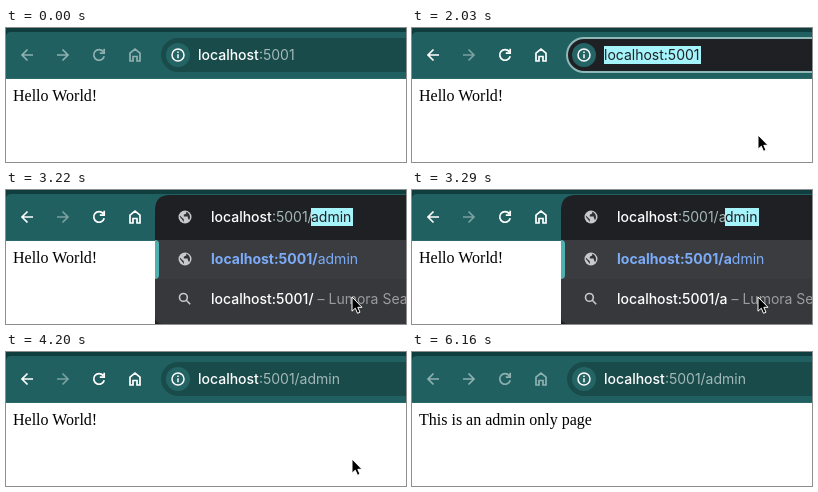
Animation of 400 by 134 pixels, one loop 6230 ms. Source, as an HTML page:

```html
<!DOCTYPE html>
<html lang="en">
<head>
<meta charset="utf-8">
<title>Visiting the admin page</title>
<style>
  html, body { margin: 0; width: 100%; height: 100%; overflow: hidden; background: #fff; }
  svg { display: block; width: 400px; height: 134px; }
  text { font: 14px Inter, Roboto, sans-serif; white-space: pre; }
  .host { fill: #fff; font-weight: 500; }
  .path { fill: #a3b8b8; }
  .dark { fill: #1f2023; }
  .page { font: 16px "Liberation Serif", "Times New Roman", serif; fill: #000; }
  .link { fill: #7cacf8; }
  .bold { font-weight: 700; }
  .hint { fill: #9a9ca0; }
  .line { fill: none; stroke-width: 1.7; }
</style>
</head>
<body>
<svg viewBox="0 0 400 134">
  <defs>
    <g id="globe">
      <circle r="6.5" fill="#c7cacd"/>
      <path d="M-5.2-1.6 -1.2 2.2V5.2C-4-.0 -5.2 1-5.2-1.6ZM1.2-5.2V-3.4L-1.2-2.2V-.4H2.6L3.4 2.4H4.6C5.8-.6 4.6-4 1.2-5.2Z" fill="#303134"/>
    </g>
  </defs>
  <rect width="400" height="134" fill="#fff"/>
  <rect width="400" height="51" fill="#103d3d"/>
  <path d="M0 51V9Q0 4 5 4H400V51Z" fill="#206060"/>
  <rect y="50" width="400" height="1" fill="#2b6a6a"/>

  <g class="line">
    <path id="back" d="M27 27H16M21.5 21.5 16 27 21.5 32.5"/>
    <path id="forward" d="M51 27H62M56.5 21.5 62 27 56.5 32.5"/>
    <path id="reload" d="M97.2 23.6A5.3 5.3 0 1 0 98.2 28.2M98.2 20.8V25.2H93.8"/>
    <path id="home" d="M124 25.2 129 21 134 25.2V33H131V28.5H127V33H124Z"/>
  </g>

  <g id="bar">
    <rect id="pill" x="155" y="10" width="290" height="34" rx="17"/>
    <circle cx="172" cy="27" r="12" fill="#246464"/>
    <circle cx="172" cy="27" r="6" fill="none" stroke="#fff" stroke-width="1.5"/>
    <path d="M172 26.3V30.2M172 23.6V25" stroke="#fff" stroke-width="1.5"/>
    <rect id="mark" x="192" y="18" width="97" height="18" fill="#a5f3fb"/>
    <text x="192" y="32"><tspan id="host" class="host">localhost</tspan><tspan id="path" class="path"></tspan></text>
    <rect id="barCaret" x="289" y="18" width="1" height="17" fill="#fff"/>
  </g>

  <text id="body" class="page" x="7" y="73"></text>

  <g id="popup">
    <path d="M149 134V20Q149 5 164 5H400V134Z" fill="#1f2023"/>
    <path d="M149 50H400V134H157Q149 134 149 126Z" fill="#37383b"/>
    <rect x="149" y="50" width="251" height="39" fill="#3b3c3f"/>
    <path d="M149 50Q153 50 153 54V85Q153 89 149 89Z" fill="#4fb0b0"/>
    <use href="#globe" x="179" y="27"/>
    <use href="#globe" x="179" y="69"/>
    <g fill="none" stroke="#c7cacd" stroke-width="1.6">
      <circle cx="177.4" cy="107.4" r="3.9"/>
      <path d="M180.3 110.3 184.2 114.2"/>
    </g>
    <text x="205" y="32"><tspan class="host">localhost</tspan><tspan class="path">:5001/</tspan><tspan id="typed" class="path"></tspan></text>
    <rect id="restMark" y="18" height="18" fill="#a5f3fb"/>
    <text id="rest" class="dark" y="32"></text>
    <rect id="popCaret" x="347" y="18" width="1" height="17" fill="#fff"/>
    <text class="link" x="205" y="74"><tspan id="match" class="bold"></tspan><tspan id="matchRest"></tspan></text>
    <text x="205" y="114"><tspan id="query" class="host"></tspan><tspan class="hint"> – Lumora Search</tspan></text>
  </g>

  <path id="cursor" d="M346 107V121.2L349.3 118.2 351.5 123.3 354 122.2 351.8 117.3H356Z" fill="#000" stroke="#fff" stroke-width="1" stroke-linejoin="round"/>
</svg>
<script>
const LOOP = 6230;
const WORD = "admin";
const KEY_TIMES = [3290, 3430, 3570, 3780, 3920];
const EDGES = [305, 313, 322, 334, 337, 347];
const el = id => document.getElementById(id);
const show = (id, on) => el(id).setAttribute("visibility", on ? "visible" : "hidden");
const put = (id, text) => { el(id).textContent = text; };
const set = (id, attrs) => {
  for (const key in attrs) el(id).setAttribute(key, attrs[key]);
};

function drawButtons(active) {
  for (const id of ["back", "reload", "home"]) {
    set(id, { stroke: active ? "#fff" : "#8fb0b0" });
  }
  set("forward", { stroke: active ? "#7aa0a0" : "#8fb0b0" });
}

function drawBar(t) {
  const focused = t >= 1960 && t < 4200;
  const selected = t >= 2030 && t < 2520;
  set("pill", {
    fill: focused ? "#1f2023" : "#1a4b4b",
    stroke: focused ? "#8fb8b8" : "none",
    "stroke-width": 2
  });
  show("mark", selected);
  set("host", { class: selected ? "dark" : "host" });
  set("path", { class: selected ? "dark" : "path" });
  put("path", t >= 4200 ? ":5001/admin" : ":5001");
  show("barCaret", t >= 2520 && t < 3080);
}

function drawPopup(t) {
  const open = t >= 3220 && t < 4200;
  el("popup").style.display = open ? "" : "none";
  el("bar").style.display = open ? "none" : "";
  if (!open) return;
  const count = KEY_TIMES.filter(time => t >= time).length;
  const typed = WORD.slice(0, count);
  const rest = WORD.slice(count);
  const x = EDGES[count];
  put("typed", typed);
  put("rest", rest);
  set("rest", { x });
  set("restMark", { x, width: EDGES[5] - x });
  show("popCaret", !rest);
  put("match", "localhost:5001/" + typed);
  put("matchRest", rest);
  put("query", "localhost:5001/" + typed);
}

function draw(t) {
  drawButtons(t >= 770 && t < 6160);
  drawBar(t);
  drawPopup(t);
  put("body", t >= 4270 ? "This is an admin only page" : "Hello World!");
  show("cursor", t >= 1960 && t < 5600);
  set("cursor", { transform: t >= 5530 ? "translate(-3 3)" : "" });
}

const start = performance.now();
function tick() {
  draw((performance.now() - start) % LOOP);
  requestAnimationFrame(tick);
}
tick();
</script>
</body>
</html>
```
